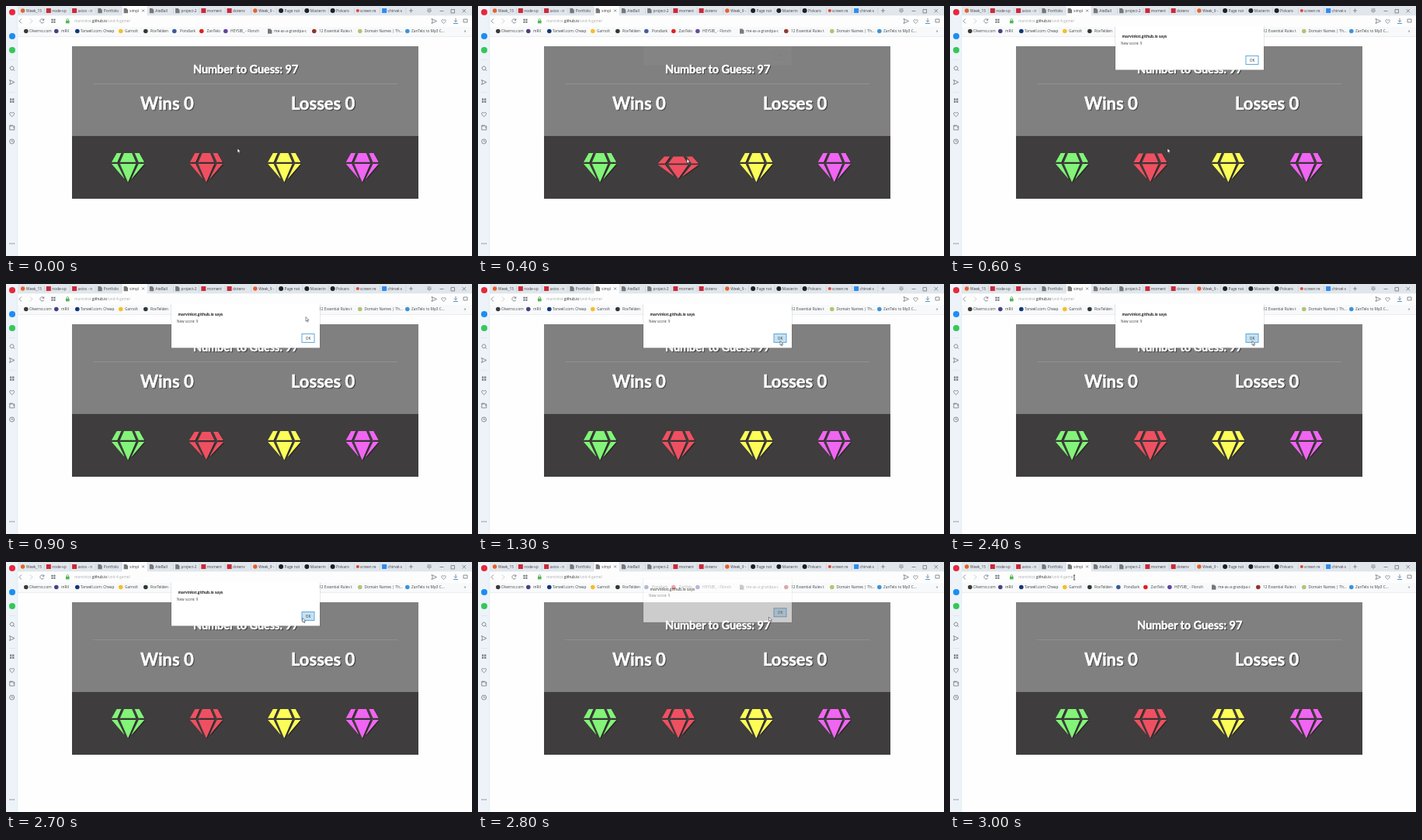
These frames come from a looping animation (600x323 px, 3100 ms). An HTML page:

```html
<!DOCTYPE html>
<html lang="en">
<head>
<meta charset="utf-8">
<title>Gem game</title>
<style>
  html, body { margin: 0; width: 100%; height: 100%; overflow: hidden; background: #fefefe; }
  svg { display: block; width: 600px; height: 323px; }
  text { font: 4.8px "Open Sans", "Noto Sans", sans-serif; fill: #444; white-space: pre; }
  .url { font-size: 4.7px; fill: #a9adb1; }
  .url .host { fill: #222; }
  .hand text { font-family: Lato, sans-serif; font-weight: 700; }
  .shade { fill: #333; stroke: #333; stroke-width: .6; stroke-linejoin: round; opacity: .75; }
  .chalk { fill: #fff; stroke: #fff; stroke-width: .5; stroke-linejoin: round; }
  .line { fill: none; stroke: #6d747b; stroke-width: .8; stroke-linejoin: round; }
</style>
</head>
<body>
<svg id="stage" viewBox="0 0 600 323" xmlns="http://www.w3.org/2000/svg"></svg>
<script>
const LOOP = 3100, STEP = 100;

// drawing helpers
const rect = (x, y, w, h, fill, more = '') =>
  `<rect x="${x}" y="${y}" width="${w}" height="${h}" fill="${fill}" ${more}/>`;
const dot = (x, y, r, fill) => `<circle cx="${x}" cy="${y}" r="${r}" fill="${fill}"/>`;
const line = (d, more = '') => `<path class="line" d="${d}" ${more}/>`;
const text = (x, y, s, more = '') => `<text x="${x}" y="${y}" ${more}>${s}</text>`;
const page = (x, y) =>
  `<path d="M${x} ${y - 3}h3.4l2 2v4.2h-5.4z" fill="#777"/>`;
const heart = (x, y, s) =>
  line(`M0 3C-5 -.5 -2.5 -4.2 0 -1.6C2.5 -4.2 5 -.5 0 3z`, `transform="translate(${x} ${y}) scale(${s})"`);
const plane = (x, y) => line(`M${x - 3} ${y - 3}l6.5 3l-6.5 3l1.3 -3z`);
const grid = (x, y, s) => [[0, 0], [1, 0], [0, 1], [1, 1]].map(([i, j]) =>
  rect(x - s + i * (s + .4), y - s + j * (s + .4), s - .5, s - .5, '#6d747b')).join('');

const icon = {
  fox: (x, y) => dot(x + 3, y, 2.7, '#e8602c'),
  pkg: (x, y) => rect(x, y - 3, 6, 6, '#cb2838'),
  doc: page,
  hub: (x, y) => dot(x + 3, y, 3, '#1d1f22'),
  find: (x, y) => dot(x + 2, y, 2.1, '#dd4b39'),
  blue: (x, y) => rect(x, y - 3, 6, 6, '#2d8cf0')
};

function tabs() {
  const list = [
    ['fox', 'Week_15'], ['pkg', 'node-sp'], ['pkg', 'axios - n'], ['doc', 'Portfolio'],
    ['doc', 'simpl'], ['doc', 'AteBall'], ['doc', 'project-2'], ['pkg', 'moment'],
    ['pkg', 'dotenv'], ['fox', 'Week_9 -'], ['hub', 'Page not'], ['hub', 'Masterin'],
    ['hub', 'Polvaro'], ['find', 'screen re'], ['blue', 'chirvel-s']
  ];
  return list.map(([kind, label], i) => {
    const x = 18.6 + 33.25 * i, open = i === 4;
    return (open ? rect(x - 2, 0, 32, 13, '#fdfdfd') : rect(x + 30.5, 2, .6, 8, '#c3cad1')) +
      icon[kind](x, 6) + text(x + (kind === 'find' ? 5 : 7.5), 7.8, label) +
      (open ? line(`M${x + 23.5} 4.5l3 3m0 -3l-3 3`) : '');
  }).join('');
}

function bookmarks() {
  const list = [
    [23, 30, '#3a3a3a', 'Olverno.com'], [62, 71, '#4d3d80', 'mRil'],
    [89, 96, '#11357e', 'Tarwell.com: Cheap'], [145, 153, '#f6bd27', 'Garnolt'],
    [177, 186, '#2d3a32', 'RovTelden'], [214, 224, '#3b5998', 'Pondlark'],
    [249, 258.5, '#e02020', 'ZanTelo'], [280, 289, '#6441a5', 'HEYSIB_ - Flonch'],
    [337, 345, '', 'me-as-a-grandpa-c'], [394, 403, '#8f3526', '12 Essential Rules t'],
    [453, 461.5, '#b5c270', 'Domain Names | Th...'], [514, 522, '#3f92d2', 'ZanTelo to Mp3 C...']
  ];
  return list.map(([x, tx, fill, label]) =>
    (fill ? dot(x + 2.8, 32.5, 2.8, fill) : page(x, 32.5)) + text(tx, 34.4, label)).join('');
}

function browser() {
  return rect(0, 0, 600, 323, '#fefefe') +
    rect(0, 0, 600, 12.5, '#e0e6ec') + tabs() +
    line('M521.5 3.5v5m-2.5 -2.5h5') +
    line('M542.5 4h5m-5 2h5l-2.5 2.5z') + line('M558.5 6.5h5') +
    line('M573 4.5h4.5v4.5h-4.5z') + line('M587.5 4l4.5 4.5m0 -4.5l-4.5 4.5') +
    rect(15, 12.5, 585, 14.5, '#fdfdfd') + rect(15, 27, 585, 12, '#f8f9fa') +
    rect(15, 39, 585, .7, '#e4e7ea') +
    line('M20 16.5l-3 3l3 3') + line('M31 16.5l3 3l-3 3', 'opacity=".45"') +
    line('M48.7 18a2.6 2.6 0 1 0 .2 2.4m0 -4v2h-2') + grid(61, 19.3, 2.6) +
    rect(77, 18.8, 4.6, 3.6, '#4fb653') +
    '<path d="M78 19v-1.2a1.3 1.3 0 0 1 2.6 0v1.2" fill="none" stroke="#4fb653" stroke-width=".8"/>' +
    text(88, 21.3, 'marvinkst.<tspan class="host">github.io</tspan>/unit-4-game/', 'class="url"') +
    plane(551, 19.5) + heart(563.5, 19.8, .9) +
    line('M579 15.8v4.8m-2 -2l2 2l2 -2') + rect(576, 22, 6, 1, '#3a9de0') +
    line('M589 17h5v4h-5z') +
    bookmarks() + text(590, 34.2, '»');
}

function sidebar() {
  return rect(0, 0, 15, 323, '#edf3f8') + rect(14.6, 12, .6, 311, '#dfe5ea') +
    dot(8, 8, 4, '#e8283c') + dot(8, 39, 4, '#1d8df2') + dot(8, 57, 4, '#35c75a') +
    rect(4, 69.5, 8, .5, '#d3dae0') + rect(4, 111, 8, .5, '#d3dae0') +
    line('M9.4 82a2.4 2.4 0 1 0 -3.6 -3.2a2.4 2.4 0 0 0 3.6 3.2l1.8 1.8') +
    plane(7.5, 98.5) + grid(7.8, 122.2, 2.7) + heart(7.7, 140, 1) +
    line('M4.8 155h6v5h-6zm0 0v-.8h4m.2 2.6h1.8') +
    line('M4.7 175a3 3 0 1 0 6 0a3 3 0 1 0 -6 0m3 -1.7v1.9h1.5') +
    [5.3, 7.8, 10.3].map(x => dot(x, 307, .65, '#555c63')).join('');
}

const GEM = 'M486 0L576 160H475L406 0zM358 0L427 160H149L218 0zM90 0H170L101 160H0z' +
  'M0 192H101L225 446L219 448zM148 192H428L291 510L285 510zM475 192H576L357 448L351 446z';

function gem(x, fill, id) {
  const shape = (dx, dy, c, o) =>
    `<path d="${GEM}" fill="${c}" opacity="${o}" transform="translate(${dx - 21} ${dy - 18.8}) scale(.0732)"/>`;
  return `<g id="${id}" transform="translate(${x} 208.8)">` +
    shape(1.1, 1.1, '#1d1b1b', .6) + shape(0, 0, fill, 1) + '</g>';
}

function hand(x, y, size, s) {
  const at = (d, cls) => text(x + d, y + d, s, `class="${cls}" style="font-size:${size}px"`);
  return at(1.1, 'shade') + at(0, 'chalk');
}

function game() {
  return rect(85, 52, 446, 115.5, '#808080') + rect(85, 167.5, 446, 81.5, '#3f3d3d') +
    rect(112, 100, 392, .8, '#959595') +
    '<g class="hand">' + hand(241, 87.3, 14.4, 'Number to Guess: 97') +
    hand(173, 133.5, 22, 'Wins 0') + hand(367, 133.5, 22, 'Losses 0') + '</g>' +
    gem(157, '#82f478', 'green') + gem(257.8, '#ef5061', 'red') +
    gem(358.2, '#fdfd58', 'yellow') + gem(458.7, '#f065f2', 'pink');
}

function alertBox() {
  return '<g id="alert">' + rect(212.3, 26, 192.4, 57.2, '#000', 'opacity=".12"') +
    rect(213, 26, 191, 56.5, '#fff') +
    text(221.5, 41.2, 'marvinkst.github.io says', 'style="font-weight:700;fill:#222;font-size:4.7px"') +
    text(220, 50, 'New score: 9', 'style="font-size:4.6px"') +
    rect(381, 64.4, 16, 11, '#fff', 'id="ok" stroke="#4a9fd6" stroke-width=".9"') +
    text(389, 71.8, 'OK', 'text-anchor="middle" style="fill:#333"') + '</g>';
}

const pointers =
  '<path id="arrow" d="M0 0V5.6L1.3 4.5L2.2 6.5L3.1 6.1L2.2 4.1H4z" fill="#fff" stroke="#222" stroke-width=".5"/>' +
  '<path id="beam" d="M-1.2 -3H1.2M0 -3V3M-1.2 3H1.2" fill="none" stroke="#222" stroke-width=".7"/>';

const $ = id => document.getElementById(id);
$('stage').innerHTML = browser() + sidebar() + game() + alertBox() + pointers;

// rows: time, values...
const POINTER = [
  [0, 298, 184], [100, 292, 187], [200, 273, 196], [300, 269, 197.5], [500, 269, 197.5],
  [600, 280, 184], [700, 325, 122], [800, 374, 58], [900, 386, 42.5], [1000, 386.5, 46],
  [1200, 388, 66], [1300, 389, 73.5], [2600, 389, 73.5], [2800, 374.5, 71],
  [2900, 270, 46], [3000, 160, 20]
];
const ALERT = [ // opacity, lift
  [0, 0, -6], [300, 0, -6], [400, .03, -6], [500, .6, -4], [600, 1, 0],
  [2700, 1, 0], [2800, .6, -4.6], [2900, 0, -6]
];
const BOUNCE = [ // rubber band, scale x and y
  [0, 1, 1], [300, 1.25, .75], [400, .75, 1.25], [500, 1.15, .85],
  [650, .95, 1.05], [750, 1.05, .95], [1000, 1, 1]
];
const HOVER = 160;

function bezier(x1, y1, x2, y2) {
  const c = (a, b, u) => 3 * a * u * (1 - u) ** 2 + 3 * b * u * u * (1 - u) + u ** 3;
  return x => {
    let lo = 0, hi = 1;
    for (let i = 0; i < 24; i++) {
      const mid = (lo + hi) / 2;
      if (c(x1, x2, mid) < x) lo = mid; else hi = mid;
    }
    return c(y1, y2, lo);
  };
}
const ease = bezier(.25, .1, .25, 1), linear = x => x;

function sample(rows, t, curve = linear) {
  const i = rows.findIndex(r => r[0] > t);
  if (i === 0) return rows[0].slice(1);
  if (i < 0) return rows[rows.length - 1].slice(1);
  const a = rows[i - 1], b = rows[i], k = curve((t - a[0]) / (b[0] - a[0]));
  return a.slice(1).map((v, j) => v + (b[j + 1] - v) * k);
}

function draw(t) {
  const [x, y] = sample(POINTER, t), typing = t >= 3000;
  const [alpha, lift] = sample(ALERT, t);
  const [sx, sy] = sample(BOUNCE, t - HOVER, ease);
  for (const id of ['arrow', 'beam']) {
    $(id).setAttribute('transform', `translate(${x} ${y})`);
    $(id).style.display = (id === 'beam') === typing ? '' : 'none';
  }
  $('alert').setAttribute('opacity', alpha);
  $('alert').setAttribute('transform', `translate(0 ${lift})`);
  $('ok').setAttribute('fill', t >= 1200 ? '#c6e2f4' : '#fff');
  $('red').setAttribute('transform', `translate(257.8 208.8) scale(${sx} ${sy})`);
}

const start = performance.now();
function tick() {
  const t = (performance.now() - start) % LOOP;
  draw(Math.floor(t / STEP) * STEP);
  requestAnimationFrame(tick);
}
tick();
</script>
</body>
</html>
```
